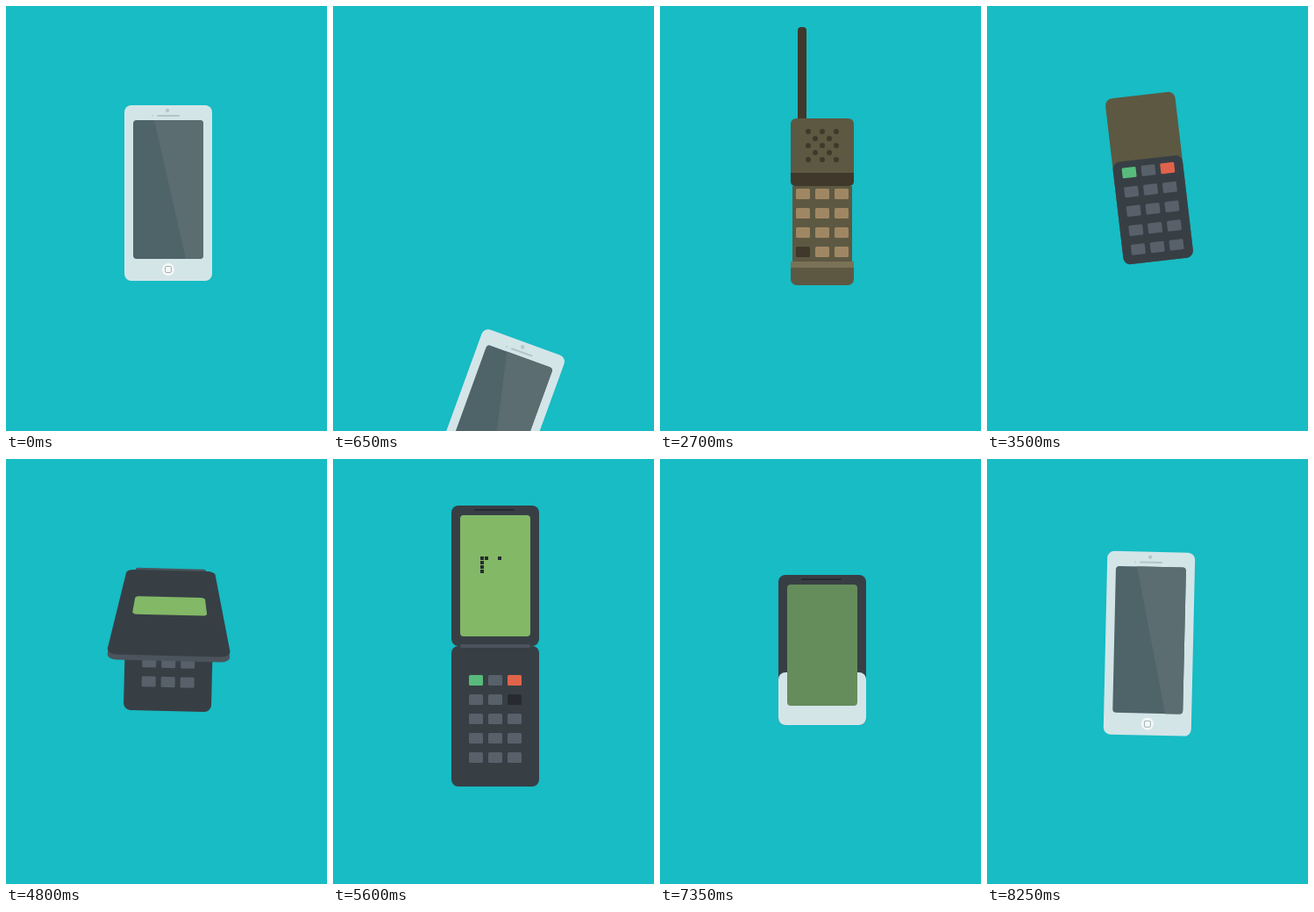
Write an HTML page that moves like this. It is 366 px wide and 484 px high and loops after 8300 ms.

```html
<!DOCTYPE html>
<html lang="en">
<head>
<meta charset="utf-8">
<title>Phone evolution</title>
<style>
html, body { margin: 0; width: 100%; height: 100%; overflow: hidden; background: #17bcc4; }
svg { display: block; width: 100%; height: 100%; }
</style>
</head>
<body>
<svg id="stage" viewBox="0 0 366 484"></svg>
<script>
const stage = document.getElementById('stage');
const LOOP = 8300, STEP = 50, CX = 185, PITCH = 22;
const DARK = '#373f45', EDGE = '#4b545c', KEY = '#586069', INK = '#272b30', LIME = '#83b867';
const BROWN = '#5d5842', SHADE = '#40382a', TAN = '#a08763', SHELL = '#d4e5e8';

// Timing: progress, easing, elastic entry and a decaying swing.
const prog = (t, from, to) => Math.min(1, Math.max(0, (t - from) / (to - from)));
const lerp = (a, b, p) => a + (b - a) * p;
const inOut = p => (1 - Math.cos(Math.PI * p)) / 2;
const outSine = p => Math.sin(Math.PI / 2 * p);
const arc = p => Math.sin(Math.PI * p);
const pop = x => x <= 0 ? 0 : 1 - Math.exp(-.0119 * x) * Math.cos(.026 * x);
const swing = (p, turns) => Math.sin(2 * Math.PI * turns * p) * Math.exp(-1.5 * p);

const rect = (x, y, w, h, fill, r = 0) => w > 0 && h > 0
  ? `<rect x="${x}" y="${y}" width="${w}" height="${h}" rx="${r}" fill="${fill}"/>` : '';
const box = (cx, cy, w, h, fill, r = 0) => rect(cx - w / 2, cy - h / 2, w, h, fill, r);
const dot = (x, y, r, fill) => `<circle cx="${x}" cy="${y}" r="${r}" fill="${fill}"/>`;
const group = (transform, body) => `<g transform="${transform}">${body}</g>`;
const spin = (a, cy, body, dy = 0) => group(`translate(0 ${dy}) rotate(${a} ${CX} ${cy})`, body);
const mix = (a, b, p) => `rgb(${a.map((v, i) => Math.round(lerp(v, b[i], p)))})`;

const button = (col, y, size, fill) => box(CX + PITCH * (col - 1), y, 16 * size, 12 * size, fill, 1.5);

// Five rows of keys; pressed is column + 3 * row.
function keypad(top, { pressed = -1, size = 1, from = 0 } = {}) {
  let s = '';
  for (let i = 0; i < 15; i++) {
    const y = top + 6 + PITCH * Math.floor(i / 3);
    const fill = i === pressed ? INK : i === 0 ? '#58bb7b' : i === 2 ? '#e0634b' : KEY;
    if (y - 6 >= from) s += button(i % 3, y, size, fill);
  }
  return s;
}

function front(top, bottom) {
  const home = bottom - 13;
  return rect(135, top, 100, bottom - top, SHELL, 8) +
    dot(184, top + 6, 2.2, '#b7c6c9') + dot(167, top + 12, 1, '#bccbce') +
    rect(172, top + 11, 26, 2, '#b4c3c6', 1) + dot(CX, home, 7, '#f4f8f8') +
    `<rect x="181.5" y="${home - 3.5}" width="7" height="7" rx="1.5" fill="none" stroke="#a3b2b5"/>`;
}
function glass(top, bottom, w) {
  const l = CX - w / 2, r = CX + w / 2;
  return rect(l, top, w, bottom - top, '#4f6469', 4) +
    `<path d="M${l + w * .3} ${top}H${r - 4}q4 0 4 4V${bottom - 4}q0 4 -4 4H${l + w * .75}Z" fill="#5b6d70"/>`;
}
const smartphone = (top = 113, bottom = 313) => front(top, bottom) + glass(top + 17, bottom - 25, 80);

function fall(t) {
  const x = t - 450;
  return t < 700 ? spin(.1 * x, 213, smartphone(), .0066 * x * x) : '';
}

// Walkie-talkie: the two halves part by "gap" and the keys follow the lower one.
function brick(t) {
  const body = pop(t - 1150), gap = 10 * pop(t - 1650);
  const left = 1 - prog(t, 3250, 3400);
  const mast = 104 * outSine(prog(t, 1650, 1850)) * (1 - prog(t, 3200, 3350));
  const step = Math.floor((t - 2400) / STEP);
  const pressed = step >= 0 && step < 7 ? (5 * step + 3) % 12 : -1;

  let keys = '';
  for (let i = 0; i < 12; i++) {
    const col = i % 3, row = Math.floor(i / 3), turn = (3 * col + 8 * row + 10) % 12;
    const size = left * pop(t - 1550 - 45 * Math.floor(turn / 2));
    keys += button(col, 204 + PITCH * row, size, i === pressed ? SHADE : TAN);
  }
  const lower = rect(151, 195, 68, 90, BROWN) + rect(149, 281, 72, 27, BROWN, 7) +
    rect(149, 281, 72, 7, '#7a7257') + keys;

  let upper = rect(157, 138 - mast, 10, mast + 10, SHADE, 4) + rect(149, 150, 72, 65, SHADE, 5) +
    `<path d="M149 200V145q0 -7 7 -7h58q7 0 7 7V200Z" fill="${BROWN}"/>`;
  for (let r = 0; r < 5; r++) {
    for (let c = r % 2; c < 5; c += 2) upper += dot(169 + 8 * c, 153 + 8 * r, 3 * left * pop(t - 1300), SHADE);
  }
  return group(`translate(${CX} 223) scale(${body} ${lerp(1, body, .45)}) translate(${-CX} -223)`,
    group(`translate(0 ${gap})`, lower) + group(`translate(0 ${-gap})`, upper));
}

function candybar(t) {
  const angle = 15.1 * swing(prog(t, 3250, 4050), 2), dy = -17 * arc(prog(t, 3250, 3750));
  if (t < 3400) return spin(angle, 213, brick(t), dy);
  const k = prog(t, 3350, 3450), w = lerp(72, 80, k), top = lerp(128, 118, k);
  const panel = 190 * prog(t, 3400, 3562), screen = pop(t - 3650);
  const pressed = t === 4100 ? 0 : -1;
  return spin(angle * (t < 4050), 213, rect(CX - w / 2, top, w, 190, BROWN, 8) +
    rect(CX - w / 2, 308 - panel, w, panel, DARK, 8) + keypad(198, { pressed, from: 308 - panel }) +
    box(CX, 158, 60 * screen, 38 * screen, LIME, 3), dy);
}

// Rounded panel on the hinged lid, v measured from the hinge.
function lidPanel(hinge, angle, w, v0, v1, r, fill, drop = 0) {
  const pts = [];
  for (let i = 0; i < 20; i++) {
    const corner = Math.floor(i / 5), q = (corner - 1 + (i % 5) / 4) * Math.PI / 2;
    const x = (corner < 2 ? 1 : -1) * (w / 2 - r) + r * Math.cos(q);
    const v = (corner % 3 ? v1 - r : v0 + r) + r * Math.sin(q);
    const k = 1 / (1 - v * Math.sin(angle) / 485);
    pts.push((CX + x * k).toFixed(2) + ',' + (hinge + v * Math.cos(angle) * k + drop).toFixed(2));
  }
  return `<polygon points="${pts.join(' ')}" fill="${fill}"/>`;
}

function opening(t) {
  if (t < 4700) return rect(140, 125, 90, 176, DARK, 8) + box(CX, 180, 65, 38, LIME, 3);
  const angle = Math.PI * outSine(prog(t, 4708, 5100));
  const hinge = lerp(127, 213, inOut(prog(t, 4800, 5000)));
  const lid = (...a) => lidPanel(hinge, angle, ...a);
  const bar = rect(145, hinge - 2.3, 80, 4, EDGE, 2);
  const cover = angle < Math.PI / 2
    ? bar + lid(100, 0, 160, 8, EDGE, 6) + lid(100, 0, 160, 8, DARK) + lid(70, 62.5, 97.5, 4, LIME)
    : lid(100, 0, 160, 8, DARK) + lid(80, 11, 149, 4, LIME) + lid(46, 154, 156, 1, INK) + bar;
  return spin(1.45 * arc(prog(t, 4700, 4900)), 242,
    rect(135, hinge, 100, 160, DARK, 8) + keypad(hinge + 33) + cover);
}

// The snake climbs, turns right to eat, then turns down.
function snake(t) {
  const head = Math.min(15, 5 + Math.floor((Math.max(t, 5550) - 5600) / STEP));
  const fed = head >= 8;
  let s = fed ? '' : rect(188, 111, 4, 4, INK);
  for (let i = head; i > head - (fed ? 6 : 5); i--) {
    const across = Math.min(6, Math.max(0, i - 4));
    s += rect(168 + 5 * across, 111 + 5 * (Math.max(0, 4 - i) + Math.max(0, i - 10)), 4, 4, INK);
  }
  return s;
}

function flip(t) {
  const slide = inOut(prog(t, 6900, 7350)), up = lerp(53, 132, slide), low = lerp(213, 143, slide);
  const pressed = t >= 5600 && t < 5700 ? 5 : t >= 5850 && t < 5950 ? 7 : -1;
  const size = 1 - prog(t, 6600, 6850), shell = 60 * prog(t, 7250, 7350);
  const lime = mix([131, 184, 103], [101, 141, 91], prog(t, 7200, 7350));
  return rect(135, low, 100, 160, DARK, 8) + keypad(low + 33, { pressed, size }) +
    rect(135, up, 100, 160, DARK, 8) + rect(161, up + 4, 46, 2, INK, 1) +
    (t < 6900 ? rect(145, 211, 80, 4, EDGE, 2) : '') +
    rect(135, low + 160 - shell, 100, shell, SHELL, 8) +
    rect(145, up + 11, 80, 138, lime, 4) + (t < 6650 ? snake(t) : '');
}

function reveal(t) {
  if (t < 7450) return front(113, 313) + rect(145, 140, 80, 138, '#5a7a62', 4);
  const extra = t < 7650 ? 1 - pop(t - 7450) : 0, half = 79 + 8 * extra;
  return front(113, 313) + glass(209 - half, 209 + half, 80 + 20 * extra);
}

function buzz(t) {
  const grow = prog(t, 8100, 8250);
  return spin(-4 * swing(prog(t, 8100, 8300), 1), 210, smartphone(113 - 7.3 * grow, 313 + 1.7 * grow));
}

function scene(t) {
  if (t < 500) return smartphone();
  if (t < 1200) return fall(t);
  if (t < 3250) return brick(t);
  if (t < 4650) return candybar(t);
  if (t < 5100) return opening(t);
  if (t < 7400) return flip(t);
  return t < 8150 ? reveal(t) : buzz(t);
}

let shown = -1;
function draw() {
  const t = Math.floor(performance.now() % LOOP / STEP) * STEP;
  if (t !== shown) {
    shown = t;
    stage.innerHTML = rect(0, 0, 366, 484, '#17bcc4') + scene(t);
  }
  requestAnimationFrame(draw);
}
draw();
</script>
</body>
</html>
```
